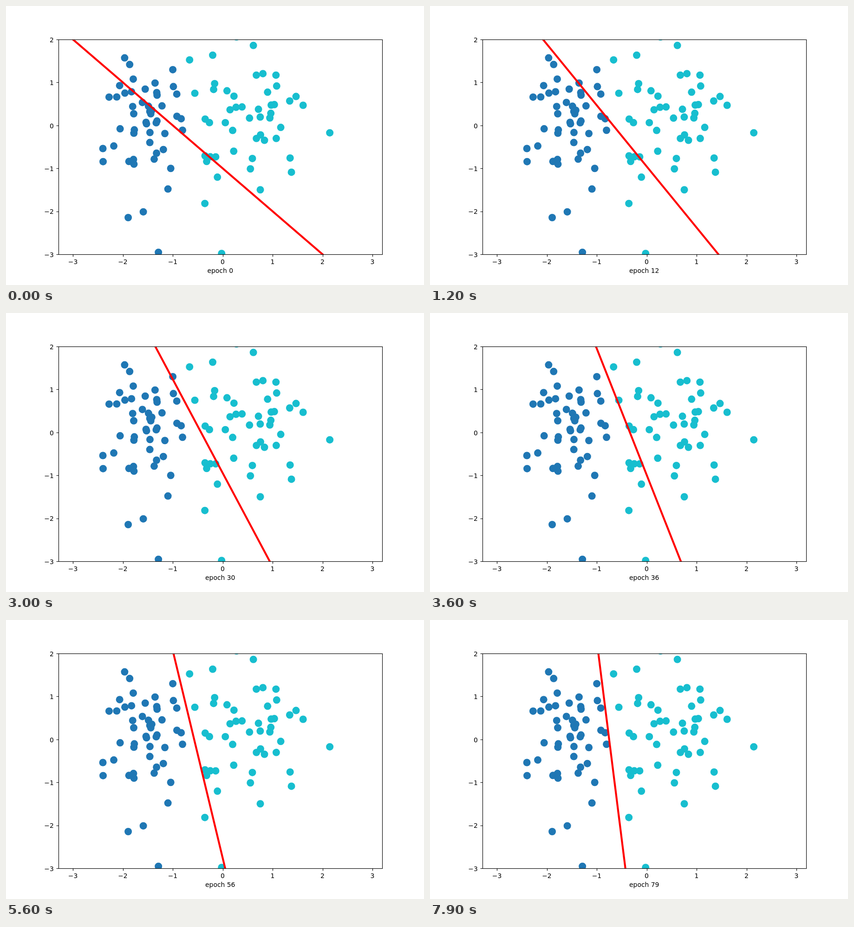
Recreate the animation shown at these times as an HTML page. Size 900 px wide and 600 px high, loop 8 s.

```html
<!DOCTYPE html>
<html lang="en">
<head>
<meta charset="utf-8">
<title>Perceptron training</title>
<style>
  html, body { margin: 0; width: 100%; height: 100%; overflow: hidden; background: #fff; }
  svg { display: block; }
  text { font: 13.89px "DejaVu Sans", sans-serif; fill: #000; }
  .axis { fill: none; stroke: #000; stroke-width: 1.11; }
</style>
</head>
<body>
<svg width="900" height="600" viewBox="0 0 900 600">
  <defs><clipPath id="area"><rect x="112.5" y="72" width="697.5" height="462"/></clipPath></defs>
  <g clip-path="url(#area)">
    <g id="points"></g>
    <line id="boundary" stroke="#f00" stroke-width="4.17"/>
  </g>
  <g id="ticks"></g>
  <rect class="axis" x="113.5" y="72.5" width="697" height="462"/>
  <text id="epoch" x="461.25" y="574" text-anchor="middle"></text>
</svg>
<script>
const STEP = 100, LOOP = 8000, RATE = 0.1, PER_CLASS = 50;
const COLORS = ["#1f77b4", "#17becf"];
const $ = id => document.getElementById(id);
const toX = x => 466.62 + 107.473 * x;
const toY = y => 256.8 - 92.4 * y;

function setAttrs(el, attrs) {
  for (const key in attrs) el.setAttribute(key, attrs[key]);
}

function add(parent, tag, attrs, text = "") {
  const el = document.createElementNS("http://www.w3.org/2000/svg", tag);
  setAttrs(el, attrs);
  el.textContent = text;
  parent.append(el);
}

// Mersenne Twister with uniform and polar-method normal draws.
function createRandom(seed) {
  const size = 624, state = new Uint32Array(size);
  let index = 0, spare = null;
  state[0] = seed;
  for (let i = 1; i < size; i++) {
    const prev = state[i - 1];
    state[i] = Math.imul(prev ^ (prev >>> 30), 1812433253) + i;
  }

  function next() {
    const following = (index + 1) % size;
    let y = (state[index] & 0x80000000) | (state[following] & 0x7fffffff);
    state[index] = state[(index + 397) % size] ^ (y >>> 1) ^ (y & 1 ? 0x9908b0df : 0);
    y = state[index];
    index = following;
    y ^= y >>> 11;
    y ^= (y << 7) & 0x9d2c5680;
    y ^= (y << 15) & 0xefc60000;
    y ^= y >>> 18;
    return y >>> 0;
  }

  function uniform() {
    const high = next() >>> 5, low = next() >>> 6;
    return (high * 2 ** 26 + low) / 2 ** 53;
  }

  function normal() {
    if (spare !== null) {
      const value = spare;
      spare = null;
      return value;
    }
    let a, b, r;
    do {
      a = 2 * uniform() - 1;
      b = 2 * uniform() - 1;
      r = a * a + b * b;
    } while (r >= 1 || r === 0);
    const factor = Math.sqrt(-2 * Math.log(r) / r);
    spare = factor * a;
    return factor * b;
  }

  return { uniform, normal };
}

// Two clusters, separated along x only.
function makePoints(seed, separation) {
  const { uniform, normal } = createRandom(seed);
  const normals = () => Array.from({ length: 2 * PER_CLASS }, normal);
  const centers = [-uniform(), uniform()];
  const scale = separation * uniform();
  const xs = normals();
  const spreads = centers.map(() => 2 * uniform() - 1);
  const ys = normals();
  return xs.map((x, i) => {
    const label = i < PER_CLASS ? 0 : 1;
    return { x: x * spreads[label] + centers[label] * scale, y: ys[i], label };
  });
}

const points = makePoints(41, 10);

// Misclassified samples met during training: epoch, rough x, rough y.
const corrections = [
  [4, -0.99, 0.91], [8, -0.92, 0.73], [18, -1, 1.3], [24, -0.92, 0.73], [35, -1, 1.3],
  [40, -0.14, -0.73], [48, -0.36, -0.71], [52, -0.36, -0.71], [62, -0.02, -2.98], [73, -0.66, 1.53]
];

function nearest(x, y) {
  const distance = p => Math.hypot(p.x - x, p.y - y);
  return points.reduce((best, p) => distance(p) < distance(best) ? p : best);
}

// Perceptron rule: each correction pulls the weights toward the sample's class.
function weightsAt(epoch) {
  const w = { bias: 1, x: 1, y: 1 };
  for (const [when, x, y] of corrections) {
    if (when > epoch) break;
    const p = nearest(x, y), step = p.label ? RATE : -RATE;
    w.bias += step;
    w.x += step * p.x;
    w.y += step * p.y;
  }
  return w;
}

function drawTicks() {
  const ticks = $("ticks");
  const label = n => String(n).replace("-", "\u2212");
  for (let n = -3; n <= 3; n++) {
    const x = toX(n);
    add(ticks, "path", { class: "axis", d: `M${Math.round(x) + 0.5} 534.5v4.9` });
    add(ticks, "text", { x: x - 0.2, y: 555, "text-anchor": "middle" }, label(n));
  }
  for (let n = -3; n <= 2; n++) {
    const y = toY(n);
    add(ticks, "path", { class: "axis", d: `M113.5 ${Math.round(y) + 0.5}h-4.9` });
    add(ticks, "text", { x: 102.8, y: Math.round(y + 5.8), "text-anchor": "end" }, label(n));
  }
}

function render(time) {
  const epoch = Math.floor((time % LOOP) / STEP);
  const w = weightsAt(epoch);
  const boundaryX = y => toX(-(w.bias + w.y * y) / w.x);
  const top = 2.2, bottom = -3.2;
  setAttrs($("boundary"), { x1: boundaryX(top), y1: toY(top), x2: boundaryX(bottom), y2: toY(bottom) });
  $("epoch").textContent = `epoch ${epoch}`;
}

for (const p of points) {
  add($("points"), "circle", { cx: toX(p.x), cy: toY(p.y), r: 7.99, fill: COLORS[p.label] });
}
drawTicks();
render(0);

const start = performance.now();
function tick() {
  render(performance.now() - start);
  requestAnimationFrame(tick);
}
requestAnimationFrame(tick);
</script>
</body>
</html>
```
